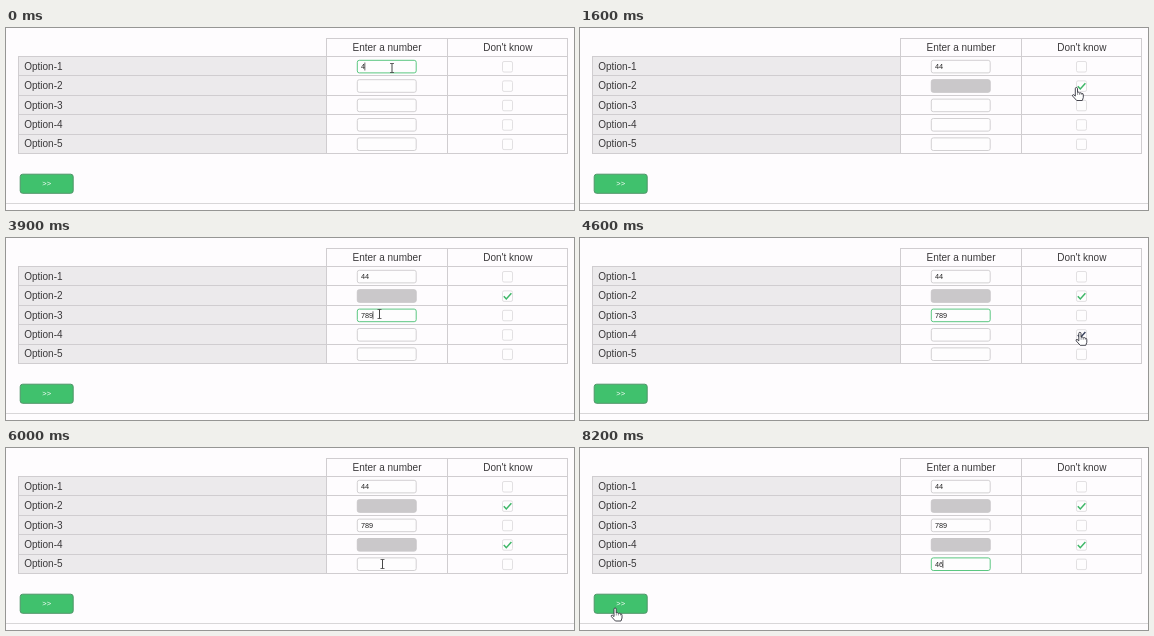
An HTML page with a canvas for the animation above (8.3 s loop, 568 by 182 pixels).

```html
<!DOCTYPE html>
<html lang="en">
<head>
<meta charset="utf-8">
<title>Number or don't know</title>
<style>
html, body { margin: 0; width: 100%; height: 100%; overflow: hidden; background: #fefcfe; }
canvas { display: block; width: 568px; height: 182px; }
</style>
</head>
<body>
<canvas id="stage"></canvas>
<script>
const W = 568, H = 182, LOOP = 8300;
const FONT = '"Liberation Sans", Arial, sans-serif';
const GREEN = '#40c16d', LINE = '#d0cdd0', INK = '#3a383a';
const canvas = document.getElementById('stage');
const ctx = canvas.getContext('2d');
const scale = window.devicePixelRatio || 1;
canvas.width = W * scale;
canvas.height = H * scale;

const rowY = i => 38.5 + i * 19.4;

// Typed values: [row, time, value]
const typing = [
  [0, 0, '4'], [0, 300, '44'],
  [2, 3200, '7'], [2, 3500, '78'], [2, 3800, '789'],
  [4, 6900, '4'], [4, 7140, '46']
];
// Focus changes: [time, row], -1 is none
const focusing = [[0, 0], [1400, -1], [2700, 2], [4700, -1], [6200, 4]];
const checkTimes = { 1: 1400, 3: 4600 };

// Pointer stops: [time, x, y]
const stops = [
  [0, 386, 40], [500, 386, 40], [1200, 495.3, 59.5], [1800, 495.3, 59.5],
  [2500, 373.5, 76], [3900, 373.5, 76], [4500, 498.8, 94.3], [5000, 498.8, 94.3],
  [5700, 376.5, 116], [6100, 376.5, 116], [6400, 375.5, 114.5],
  [7400, 375.5, 114.5], [8000, 34, 160], [LOOP, 34, 160]
];

const ease = u => u * u * (3 - 2 * u);

function pointerAt(t) {
  const i = Math.max(1, stops.findIndex(s => s[0] > t));
  const [t0, x0, y0] = stops[i - 1], [t1, x1, y1] = stops[i];
  const u = ease((t - t0) / (t1 - t0));
  return [x0 + (x1 - x0) * u, y0 + (y1 - y0) * u];
}

function text(str, x, y, size, color = INK, align = 'left') {
  ctx.font = `${size}px ${FONT}`;
  ctx.textAlign = align;
  ctx.fillStyle = color;
  ctx.fillText(str, x, y);
}

function line(x0, y0, x1, y1, color = LINE, width = 1) {
  ctx.beginPath();
  ctx.moveTo(x0, y0);
  ctx.lineTo(x1, y1);
  ctx.strokeStyle = color;
  ctx.lineWidth = width;
  ctx.stroke();
}

function box(x, y, w, h, r, fill, stroke) {
  ctx.beginPath();
  ctx.roundRect(x, y, w, h, r);
  ctx.fillStyle = fill;
  ctx.fill();
  ctx.strokeStyle = stroke;
  ctx.lineWidth = 1;
  ctx.stroke();
}

function drawTable() {
  ctx.fillStyle = '#eceaec';
  ctx.fillRect(12.5, 28.5, 308, 97);
  line(320, 10.5, 562, 10.5);
  for (let i = 0; i <= 5; i++) {
    const y = Math.round(28 + i * 19.4) + 0.5;
    line(12, y, 562, y);
  }
  line(12.5, 28, 12.5, 126);
  for (const x of [320.5, 441.5, 561.5]) line(x, 10, x, 126);
  text('Enter a number', 381, 23, 10, INK, 'center');
  text("Don't know", 501.8, 23, 10, INK, 'center');
  for (let i = 0; i < 5; i++) text('Option-' + (i + 1), 18.2, rowY(i) + 3.2, 10);
}

function drawInput(row, t, focus) {
  const y = rowY(row);
  const delay = row === 3 ? 100 : 0;
  if (t >= checkTimes[row] + delay) {
    box(351.3, y - 6.2, 58.9, 12.6, 2, '#cac8ca', '#c8c6c8');
    return;
  }
  const focused = focus[1] === row;
  box(351.3, y - 6.2, 58.9, 12.6, 2, '#fefdfe', focused ? '#5bc781' : '#d2d0d2');
  const typed = typing.filter(k => k[0] === row && k[1] <= t).pop();
  const value = typed ? typed[2] : '';
  text(value, 355, y + 2.8, 7.3, '#222');
  const since = t - Math.max(focus[0], typed ? typed[1] : 0);
  if (focused && since % 1060 < 530) {
    const x = 354.8 + ctx.measureText(value).width;
    line(x, y - 4, x, y + 4, '#444', 0.8);
  }
}

function drawCheckbox(row, t) {
  const y = rowY(row), since = t - checkTimes[row];
  box(496.5, y - 5, 10, 10.5, 1.5, '#fefdfe', '#e2e0e2');
  if (!(since >= 0)) return;
  ctx.beginPath();
  ctx.moveTo(497.8, y + 0.3);
  ctx.lineTo(500.3, y + 3);
  ctx.lineTo(505.4, y - 2.6);
  ctx.strokeStyle = row === 3 && since < 100 ? '#3c4560' : '#3fb768';
  ctx.lineWidth = 1.5;
  ctx.stroke();
}

function drawButton() {
  box(14.2, 146.2, 53, 19.1, 2.5, GREEN, '#4f9468');
  text('>>', 40.7, 157.5, 7.5, '#fff', 'center');
}

const hand = new Path2D('M0 1.2 Q0 0 1.1 0 Q2.2 0 2.2 1.2 V5 Q3.7 4.2 4.4 5.5 Q5.8 4.8 6.5 6 Q8 5.6 8 7.4 V10 L7 13 H1.4 L-2.6 8.6 Q-3.2 7.2 -1.8 7 L0 8.6 Z');
const arrow = new Path2D('M0 0 V11 L2.6 8.6 L4.3 12.5 L6 11.7 L4.3 8 H7.8 Z');

function drawPointer(t) {
  const [x, y] = pointerAt(t);
  const row = [0, 1, 2, 3, 4].find(i => Math.abs(y - rowY(i)) < 6.5);
  const overInput = row !== undefined && x > 351 && x < 410;
  const overBox = x >= 494 && x < 508;
  const overButton = x < 68 && y > 146;
  ctx.save();
  ctx.translate(x, y);
  if (overInput) {
    line(0, -4.5, 0, 4.5, '#333', 0.9);
    for (const s of [-4.5, 4.5]) line(-2, s, 2, s, '#444', 0.8);
  } else {
    const shape = overBox || overButton ? hand : arrow;
    ctx.fillStyle = '#fff';
    ctx.fill(shape);
    ctx.strokeStyle = '#34343e';
    ctx.lineWidth = 0.9;
    ctx.stroke(shape);
    if (shape === hand) {
      for (const k of [2.3, 4.4, 6.5]) line(k, 5.5, k, 7.5, '#55555f', 0.6);
    }
  }
  ctx.restore();
}

function draw(t) {
  ctx.setTransform(scale, 0, 0, scale, 0, 0);
  ctx.fillStyle = '#fefcfe';
  ctx.fillRect(0, 0, W, H);
  // Lower edge of a line of text scrolled out of view
  text('Please enter numbers', 18, 0, 9, '#d6d3c8');
  drawTable();
  const focus = focusing.filter(f => f[0] <= t).pop();
  for (let i = 0; i < 5; i++) {
    drawInput(i, t, focus);
    drawCheckbox(i, t);
  }
  drawButton();
  line(0, 175.5, W, 175.5, '#d8d6d8');
  drawPointer(t);
}

const start = performance.now();
function tick() {
  draw((performance.now() - start) % LOOP);
  requestAnimationFrame(tick);
}
tick();
</script>
</body>
</html>
```
